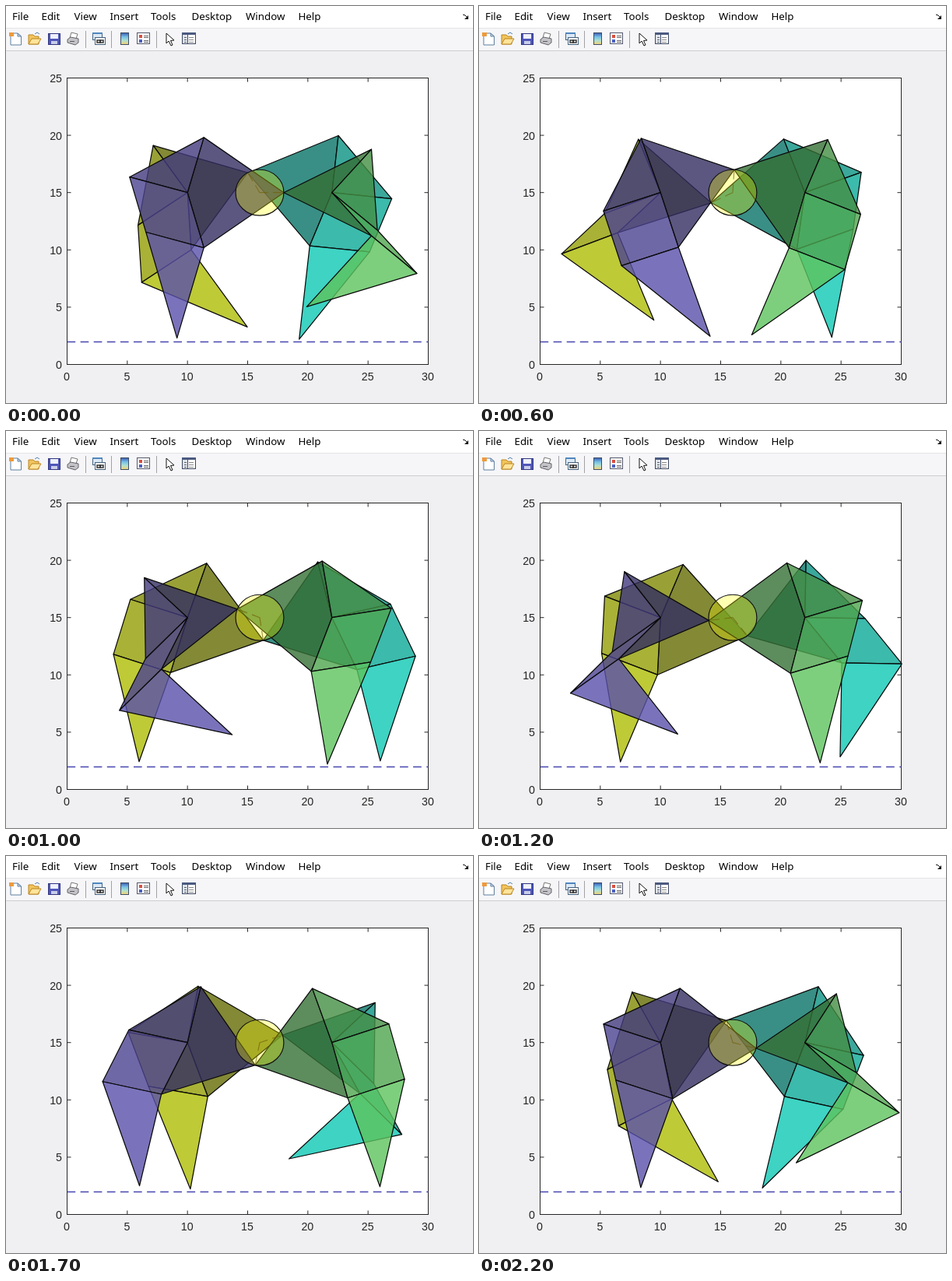
These frames come from a looping animation (600x510 px, 2.3 s). An HTML page with a canvas:

```html
<!DOCTYPE html>
<html lang="en">
<head>
<meta charset="utf-8">
<title>Walking linkage</title>
<style>
html, body { margin: 0; width: 100%; height: 100%; overflow: hidden; background: #f0eff1; }
canvas, svg { position: absolute; left: 0; top: 0; width: 600px; height: 510px; }
.menu { font: 13.3px "Noto Sans", "Open Sans", sans-serif; fill: #000; }
.tick { font: 14.2px "Liberation Sans", Arial, sans-serif; fill: #262626; }
</style>
</head>
<body>
<canvas id="stage" width="600" height="510"></canvas>
<svg id="labels" viewBox="0 0 600 510"></svg>
<script>
const ctx = document.getElementById('stage').getContext('2d');
const svg = document.getElementById('labels');

const LOOP = 2300, STEP = 100, TURN = 2 * Math.PI / 25;
const BOX = { l: 78.5, r: 542.5, t: 92.5, b: 460.5 };
const SX = (BOX.r - BOX.l) / 30, SY = (BOX.b - BOX.t) / 25;
const HUB = [16, 15], CRANK = 2, PIVOT = [10, 15], LINK = 5, ROD = 8.2;
const SHADES = { rod: 0.57, top: 0.73, mid: 0.84, foot: 1 };
const OLIVE = [176, 189, 5], TEAL = [14, 201, 180];
const PURPLE = [89, 80, 171], GREEN = [93, 196, 93];
const DASH = [10.7, 6.4];

const px = ([x, y]) => [BOX.l + x * SX, BOX.b - y * SY];
const add = (p, q, k = 1) => [p[0] + q[0] * k, p[1] + q[1] * k];
const mirror = ([x, y]) => [2 * HUB[0] - x, y];

function label(text, x, y, cls, anchor) {
  const el = document.createElementNS('http://www.w3.org/2000/svg', 'text');
  el.setAttribute('x', x);
  el.setAttribute('y', y);
  el.setAttribute('class', cls);
  el.setAttribute('text-anchor', anchor);
  el.textContent = text;
  svg.append(el);
}

function rect(x, y, w, h, fill, stroke) {
  if (fill) { ctx.fillStyle = fill; ctx.fillRect(x, y, w, h); }
  if (stroke) { ctx.strokeStyle = stroke; ctx.strokeRect(x + 0.5, y + 0.5, w - 1, h - 1); }
}

function path(points, fill, stroke, close = true) {
  ctx.beginPath();
  points.forEach(p => ctx.lineTo(p[0], p[1]));
  if (close) ctx.closePath();
  if (fill) { ctx.fillStyle = fill; ctx.fill(); }
  if (stroke) { ctx.strokeStyle = stroke; ctx.stroke(); }
}

function toolbar() {
  ctx.lineWidth = 1;
  rect(0, 0, 600, 28, '#fff');
  rect(0, 28, 600, 29, '#f6f6f8');
  rect(0, 28, 600, 1, '#e4e4e6');
  rect(0, 57, 600, 1, '#cfcfd2');
  [102, 135, 193].forEach(x => rect(x, 32, 1, 22, '#a2a2a6'));

  // new
  path([[6, 35], [15, 35], [19.5, 39], [19.5, 50], [6, 50]], '#fff', '#5f7f9f');
  path([[15, 35], [15, 39], [19.5, 39]], '#c8dcec', '#5f7f9f');
  rect(4, 34, 6, 5, '#ee9a3c');
  // open
  path([[29, 49], [29, 37], [35, 37], [37, 39], [42, 39], [42, 49]], '#f2c45c', '#b98524');
  path([[29, 49], [33, 42], [45, 42], [41, 49]], '#ffe49a', '#b98524');
  path([[37, 36], [40, 34], [43, 36]], null, '#4f7fae', false);
  // save
  rect(54, 35, 16, 15, '#4f56b8', '#30347e');
  rect(57, 36, 10, 6, '#eef1fb');
  rect(58, 45, 8, 4, '#c9cde8');
  // print
  path([[82, 41], [84, 34], [92, 36], [90, 42]], '#fff', '#777');
  path([[79, 43], [83, 40], [93, 42], [93, 47], [89, 50], [79, 47]], '#c4c4c8', '#626268');
  rect(82, 45, 6, 1, '#5a5a60');
  // link
  rect(111, 34, 13, 10, '#dce9f6', '#46627f');
  rect(111, 34, 13, 2, '#4f86bd');
  rect(114, 40, 14, 10, '#fff', '#46627f');
  ctx.lineWidth = 1.5;
  ctx.strokeStyle = '#333';
  ctx.strokeRect(117, 44, 4, 3);
  ctx.strokeRect(121, 44, 4, 3);
  ctx.lineWidth = 1;
  // colour bar
  const g = ctx.createLinearGradient(0, 35, 0, 49);
  ['#3f62b4', '#74bfe6', '#aee0d0', '#f0d27a'].forEach((c, i) => g.addColorStop(i / 3, c));
  rect(147, 34, 11, 16, g, '#3d4d66');
  // legend
  rect(168, 34, 17, 15, '#fff', '#53576c');
  rect(171, 37, 4, 4, '#d9503f');
  rect(171, 43, 4, 4, '#4a5fc1');
  [38, 40, 44, 46].forEach(y => rect(177, y, 6, 1, '#666'));
  // pointer
  path([[206, 35], [206, 48], [209, 45], [212, 51], [214, 50], [211.5, 44.5], [216, 44]], '#fff', '#111');
  // panel
  rect(226, 34, 18, 15, '#fff', '#3e4962');
  rect(226, 34, 18, 3, '#4b5a80');
  rect(227, 37, 6, 11, '#dfe4ee');
  rect(233, 37, 1, 11, '#3e4962');
  [40, 43, 46].forEach(y => { rect(229, y, 3, 1, '#666'); rect(235, y, 6, 1, '#888'); });
  // dock arrow
  path([[587, 11], [590, 12], [593, 15]], null, '#111', false);
  path([[594, 12], [594, 17], [589, 17]], '#111');
}

function axes() {
  const { l, r, t, b } = BOX;
  ctx.lineWidth = 1;
  ctx.strokeStyle = '#262626';
  ctx.strokeRect(l, t, r - l, b - t);
  for (let v = 0; v <= 30; v += 5) {
    const [x, y] = px([v, v]);
    path([[x, b], [x, b - 5]], null, '#262626', false);
    path([[x, t], [x, t + 5]], null, '#262626', false);
    if (v > 25) continue;
    path([[l, y], [l + 5, y]], null, '#262626', false);
    path([[r, y], [r - 5, y]], null, '#262626', false);
  }
}

// Joints of a left leg for a crank pin: two rods meet the pivot links.
function joints(pin) {
  const d = add(pin, PIVOT, -1), len = Math.hypot(...d);
  const along = (LINK ** 2 + len ** 2 - ROD ** 2) / (2 * len);
  const h = Math.sqrt(LINK ** 2 - along ** 2);
  const e = [d[0] / len, d[1] / len], n = [-e[1], e[0]];
  const base = [e[0] * along, e[1] * along];
  const up = add(base, n, h), down = add(base, n, -h);
  const side = [-up[1], up[0]];
  const knee = add(PIVOT, down);
  return {
    pin, knee,
    hip: add(PIVOT, up),
    back: add(PIVOT, side),
    heel: add(knee, side),
    toe: add(knee, up, -ROD / LINK)
  };
}

function leg(pin, color, right) {
  const j = joints(right ? mirror(pin) : pin);
  const patch = (shade, ...pts) => path(
    pts.map(p => px(right ? mirror(p) : p)),
    `rgba(${color.map(c => Math.round(c * shade))},0.8)`, '#0a0a0a');
  ctx.lineWidth = 1.25;
  ctx.lineJoin = 'round';
  patch(SHADES.rod, j.pin, j.hip, PIVOT, j.knee);
  patch(SHADES.top, j.hip, j.back, PIVOT);
  patch(SHADES.mid, PIVOT, j.back, j.heel, j.knee);
  patch(SHADES.foot, j.knee, j.heel, j.toe);
}

function dashed(a, b, color) {
  ctx.setLineDash(DASH);
  path([a, b], null, color, false);
  ctx.setLineDash([]);
}

function ground() {
  const y = Math.floor(px([0, 2])[1]) + 0.5;
  ctx.lineWidth = 1.3;
  dashed([BOX.l, y], [BOX.r, y], '#4646b0');
}

function walker(angle) {
  const pinAt = a => add(HUB, [Math.cos(a), Math.sin(a)], CRANK);
  const front = pinAt(angle), rear = pinAt(angle + 2 * Math.PI / 3);
  leg(rear, OLIVE, false);
  leg(rear, TEAL, true);
  leg(front, PURPLE, false);
  leg(front, GREEN, true);

  ctx.lineWidth = 1.2;
  [front, rear].forEach(p => dashed(px(HUB), px(p), 'rgba(50,25,10,0.65)'));
  const [x, y] = px(HUB);
  ctx.beginPath();
  ctx.ellipse(x, y, CRANK * SX, CRANK * SY, 0, 0, 2 * Math.PI);
  ctx.fillStyle = 'rgba(255,255,0,0.3)';
  ctx.fill();
  ctx.strokeStyle = '#111';
  ctx.stroke();
}

function draw(now) {
  const k = Math.floor((now % LOOP) / STEP);
  const turns = k + (k > 9) + (k > 20); // two double steps per loop
  rect(0, 0, 600, 510, '#f0eff1');
  toolbar();
  rect(BOX.l, BOX.t, BOX.r - BOX.l, BOX.b - BOX.t, '#fff');
  axes();
  ctx.save();
  ctx.beginPath();
  ctx.rect(BOX.l, BOX.t, BOX.r - BOX.l + 1, BOX.b - BOX.t);
  ctx.clip();
  ground();
  walker(turns * TURN);
  ctx.restore();
  requestAnimationFrame(() => draw(performance.now()));
}

const menu = { File: 8, Edit: 45.5, View: 87.5, Insert: 133.5, Tools: 186, Desktop: 238.5, Window: 308, Help: 375.5 };
for (const name in menu) label(name, menu[name], 18, 'menu', 'start');
for (let v = 0; v <= 30; v += 5) {
  const [x, y] = px([v, v]);
  label(v, x - 0.5, 481, 'tick', 'middle');
  if (v <= 25) label(v, 72, y + 5.5, 'tick', 'end');
}
draw(performance.now());
</script>
</body>
</html>
```
